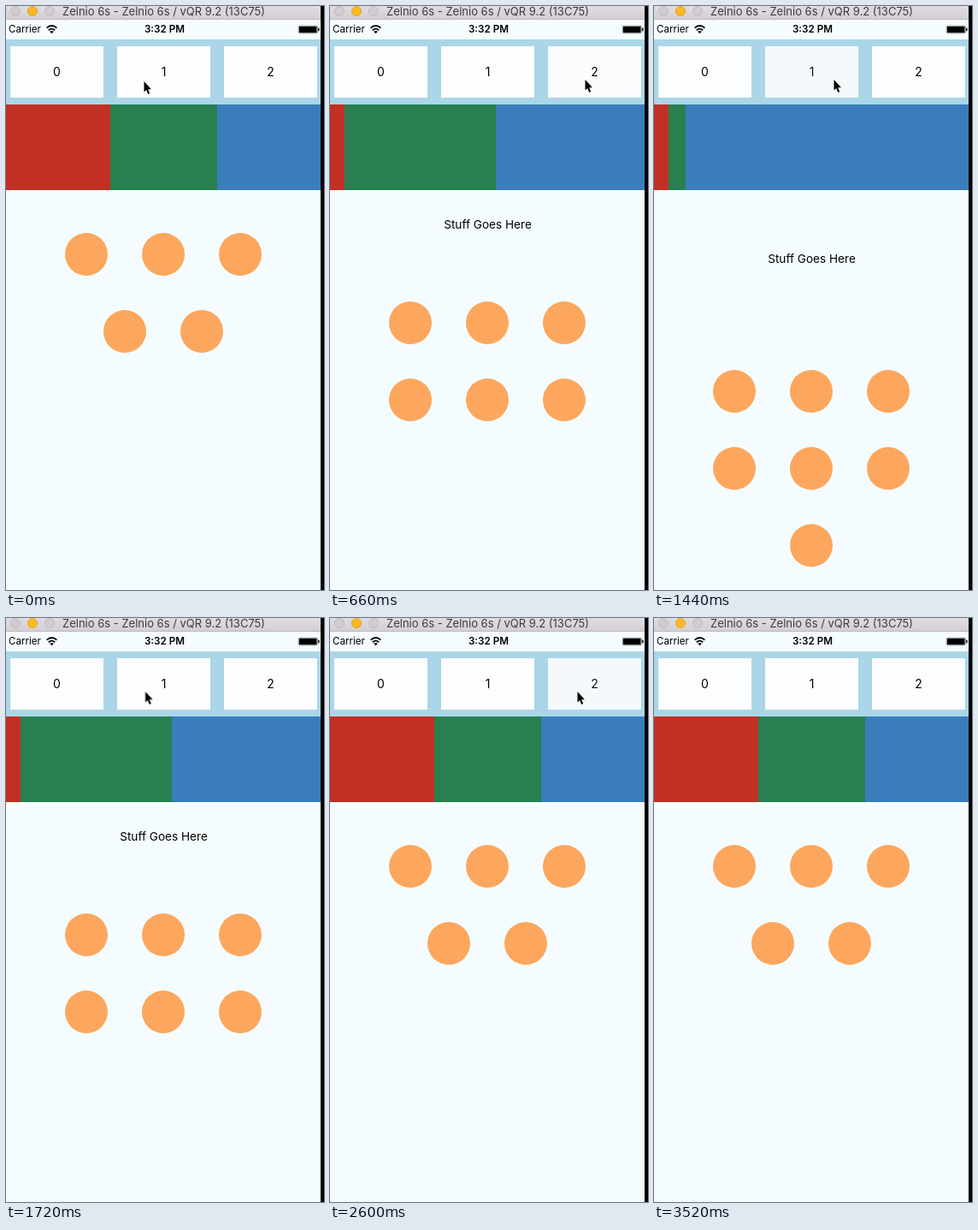
Recreate the animation shown at these times as an HTML page. Size 372 by 682 pixels, loop 3.54 s.

```html
<!DOCTYPE html>
<html lang="en">
<head>
<meta charset="utf-8">
<title>Expanding header</title>
<style>
/* --a: first step open, --b: second step open */
@property --a { syntax: "<number>"; inherits: true; initial-value: 0; }
@property --b { syntax: "<number>"; inherits: true; initial-value: 0; }

html, body { margin: 0; width: 100%; height: 100%; overflow: hidden; background: #f5fcff; }
#app {
  position: relative; width: 372px; height: 682px; overflow: hidden;
  background: #f5fcff; color: #000; font-family: Inter, sans-serif;
  --loop: 3540ms;
  --drop: calc(80px * (var(--a) + var(--b)));
  animation: stepA var(--loop) ease-in-out infinite, stepB var(--loop) ease-in-out infinite;
}
#app div, #app svg, #app span { position: absolute; box-sizing: border-box; white-space: nowrap; }

.title { left: 0; top: 0; width: 368px; height: 16px; background: linear-gradient(#e0dce1, #d3cfd5); border-bottom: 1px solid #bbb8be; }
.title span { left: 66px; top: -3px; font-size: 13px; line-height: 18px; color: #3c3a3e; }
.light { top: 0; width: 12px; height: 12px; border-radius: 50%; background: #d0ccd2; border: 1px solid #bebac0; }
.light.on { background: #fdb924; border-color: #e2a01c; }

.carrier { left: 3px; top: 19px; font-size: 11.6px; line-height: 16px; }
.clock { left: 0; width: 371px; top: 19px; text-align: center; font-size: 11.7px; font-weight: 600; line-height: 16px; }

.tabs { left: 0; top: 39px; width: 368px; height: 76px; background: #abd6e8; }
.tab { top: 8px; width: 109px; height: 60px; background: #fcfdff; font-size: 14px; line-height: 60px; text-align: center; }
.tab:nth-child(1) { left: 5px; animation: press0 var(--loop) linear infinite; }
.tab:nth-child(2) { left: 130px; animation: press1 var(--loop) linear infinite; }
.tab:nth-child(3) { left: 255px; animation: press2 var(--loop) linear infinite; }

.bars { left: 0; top: 115px; width: 368px; height: 100px; background: #3b7dbb; }
.bars div { left: 0; top: 0; height: 100px; }
.green { width: calc(247px - 53px * var(--a) - 157px * var(--b)); background: #288051; }
.red { width: calc(122px - 105px * var(--a)); background: #c03024; }

.panel { left: 0; top: 215px; width: 368px; height: var(--drop); overflow: hidden; }
.panel span { left: 0; width: 369px; top: 50%; margin-top: -10px; text-align: center; font-size: 13.6px; line-height: 20px; }

.dots { left: 0; top: 265px; transform: translateY(var(--drop)); }
.dot { left: var(--x); top: var(--y); width: 50px; height: 50px; border-radius: 50%; background: #fca75d; }
.shift { transform: translateX(calc(-45px * var(--a))); }

.edge { left: 368px; top: 0; width: 4px; height: 682px; background: #000; }
.cursor { left: 0; top: 0; overflow: visible; animation: point var(--loop) ease-in-out infinite; }

@keyframes stepA {
  0%, 1.98% { --a: 0; }
  4.52%, 56.21% { --a: 1; }
  58.7%, 73.73% { --a: 0; }
  76.27%, 91.81% { --a: 1; }
  94.35%, 100% { --a: 0; }
}
@keyframes stepB {
  0%, 19.49% { --b: 0; }
  22.03%, 40.96% { --b: 1; }
  43.5%, 73.73% { --b: 0; }
  76.27%, 91.81% { --b: 1; }
  94.35%, 100% { --b: 0; }
}
@keyframes press0 {
  0%, 55.37%, 62.15%, 90.96%, 97.74%, 100% { opacity: 1; }
  58.76%, 94.35% { opacity: .45; }
}
@keyframes press1 {
  0%, 1.13%, 7.91%, 40.11%, 46.89%, 100% { opacity: 1; }
  4.52%, 43.5% { opacity: .45; }
}
@keyframes press2 {
  0%, 18.64%, 25.42%, 72.88%, 79.66%, 100% { opacity: 1; }
  22.03%, 76.27% { opacity: .45; }
}
@keyframes point {
  0%, 5% { transform: translate(161px, 88px); }
  17%, 24% { transform: translate(298px, 86px); }
  36.7%, 45% { transform: translate(210px, 86px); }
  53.7%, 60% { transform: translate(77px, 86px); }
  71.8%, 78% { transform: translate(289px, 86px); }
  88.7%, 95.5% { transform: translate(85px, 87px); }
  98.8%, 100% { transform: translate(110px, -30px); }
}
</style>
</head>
<body>
<div id="app">
  <div class="title">
    <div class="light" style="left:5px"></div>
    <div class="light on" style="left:25px"></div>
    <div class="light" style="left:45px"></div>
    <span>Zelnio 6s - Zelnio 6s / vQR 9.2 (13C75)</span>
  </div>

  <span class="carrier">Carrier</span>
  <span class="clock">3:32 PM</span>
  <svg style="left:0;top:16px" width="368" height="23">
    <g fill="none" stroke="#000" stroke-width="1.8">
      <path d="M47.6 9.6Q53.5 4.4 59.4 9.6"/>
      <path d="M49.8 12.2Q53.5 9 57.2 12.2"/>
    </g>
    <path d="M51.2 13.8Q53.5 12 55.8 13.8L53.5 16.2Z"/>
    <rect x="342.25" y="7.25" width="22" height="8.5" rx="1.5" fill="none" stroke="#000" stroke-width=".5"/>
    <rect x="343" y="8" width="20.5" height="7" rx=".8"/>
    <rect x="365.2" y="9.5" width="1.4" height="4" rx=".7"/>
  </svg>

  <div class="tabs">
    <div class="tab">0</div>
    <div class="tab">1</div>
    <div class="tab">2</div>
  </div>
  <div class="bars"><div class="green"></div><div class="red"></div></div>
  <div class="panel"><span>Stuff Goes Here</span></div>

  <div class="dots">
    <div class="dot" style="--x:69px;--y:0px"></div>
    <div class="dot" style="--x:159px;--y:0px"></div>
    <div class="dot" style="--x:249px;--y:0px"></div>
    <div class="dot shift" style="--x:114px;--y:90px"></div>
    <div class="dot shift" style="--x:204px;--y:90px"></div>
    <div class="dot" style="--x:249px;--y:90px;opacity:var(--a)"></div>
    <div class="dot" style="--x:159px;--y:180px;opacity:var(--b)"></div>
  </div>

  <div class="edge"></div>
  <svg class="cursor" width="9" height="16">
    <path d="M.5 0V12.6L3.2 10L5.2 14.9L7.2 14L5.2 9.3H9Z" fill="#000" stroke="#fff" stroke-width="1.6" paint-order="stroke"/>
  </svg>
</div>
</body>
</html>
```
